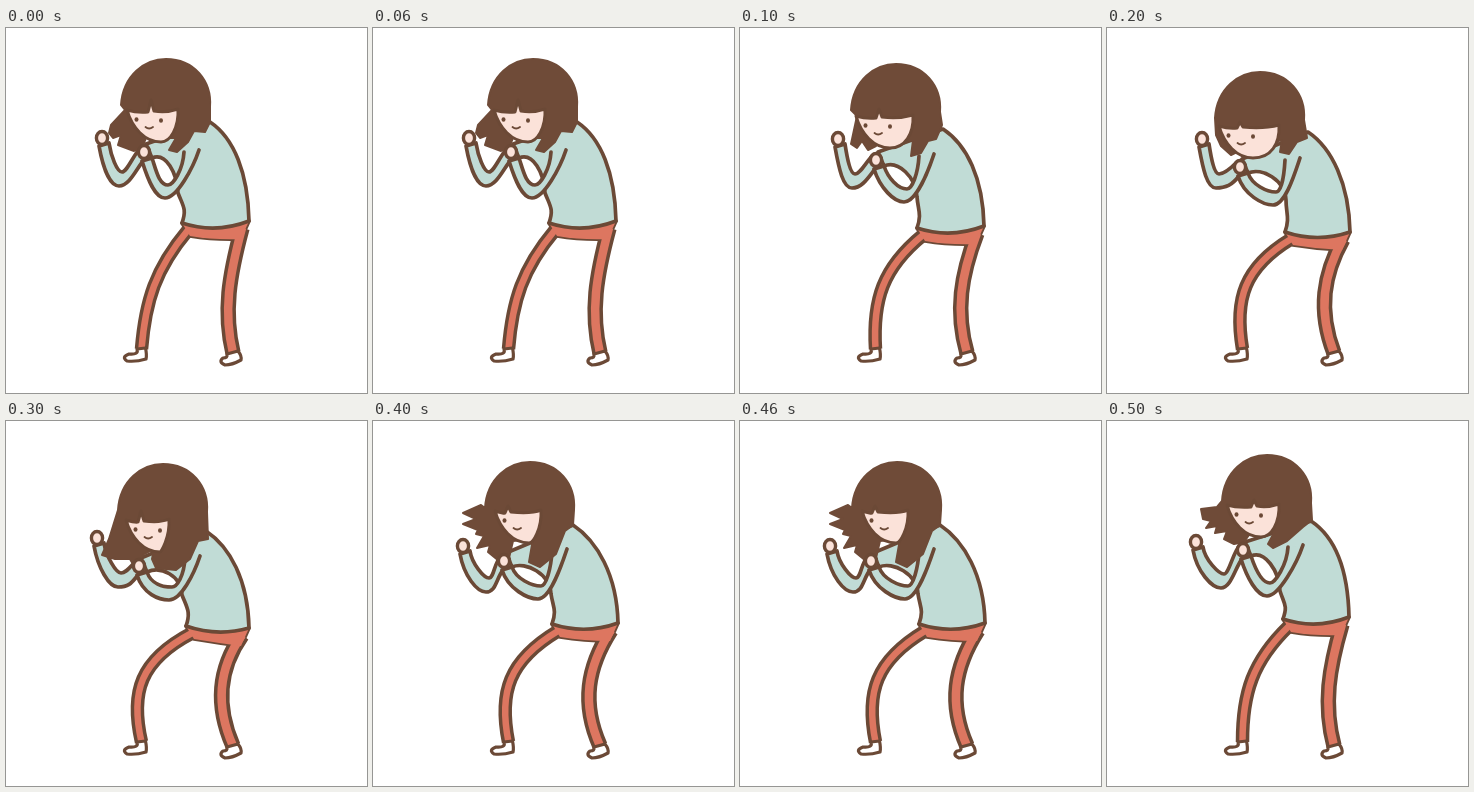
These frames come from a looping animation (361x365 px, 600 ms). An HTML page:

```html
<!DOCTYPE html>
<html lang="en">
<head>
<meta charset="utf-8">
<title>Shadow boxing</title>
<style>
  html, body { margin: 0; width: 100%; height: 100%; overflow: hidden; background: #fff; }
  svg { display: block; width: 100%; height: 100%; }
  path, ellipse { stroke: #6b4936; stroke-width: 3.7; stroke-linejoin: round; stroke-linecap: round; }
  .leg { fill: none; stroke-linecap: butt; }
  .legFill { stroke: #dd7660; }
  .pants { fill: #dd7660; }
  .shirt { fill: #c1dcd6; }
  .skin { fill: #fbe2d9; }
  .shoe { fill: #fff; stroke-width: 3.2; }
  .hair { fill: #6f4b38; stroke: #6f4b38; stroke-width: 2; }
  .hand { stroke-width: 3.4; }
  .face { stroke-width: 3; }
  .eye { fill: #6b4936; stroke: none; }
  .mouth { fill: none; stroke-width: 1.8; }
</style>
</head>
<body>
<svg id="stage" viewBox="0 0 361 365"></svg>
<script>
const STEP = 100;
const stage = document.getElementById('stage');

// Joints: back of neck, waist ends, knee x, far hand and elbow,
// near hand, elbow and shoulder.
const bodies = [
  { back: [204, 94], waist: [176, 195, 243, 193], knees: [148, 223], far: [96, 110, 113, 158], near: [138, 124, 159, 170, 193, 122] },
  { back: [203, 101], waist: [177, 200, 244, 198], knees: [143, 221.5], far: [98, 111, 112, 160], near: [136, 132, 164, 174, 194, 126] },
  { back: [201, 104], waist: [178, 204, 243, 204], knees: [139, 218], far: [95, 111, 109, 160], near: [133, 139, 166, 177, 193, 130] },
  { back: [200, 110], waist: [180, 205, 243, 207], knees: [137, 216], far: [91, 117, 112, 166], near: [133, 145, 163, 179, 194, 135] },
  { back: [200, 104], waist: [179, 203, 245, 202], knees: [138, 216.5], far: [90, 125, 113, 171], near: [131, 140, 165, 178, 194, 128] },
  { back: [204, 100], waist: [176, 198, 242, 196], knees: [145, 222], far: [89, 121, 114, 167], near: [136, 129, 160, 175, 196, 124] }
];

// Head: crown, face centre, face width to the right, parting in the fringe.
const heads = [
  { crown: [160, 31], face: [143, 92], right: 29, part: [2, -20] },
  { crown: [156, 36], face: [138, 98], right: 35, part: [1, -17] },
  { crown: [153, 44], face: [134, 108], right: 38, part: [-1, -14] },
  { crown: [157, 43], face: [142, 109], right: 21, part: [-7, -19] },
  { crown: [157, 41], face: [144, 100], right: 24, part: [-9, -15], wink: true },
  { crown: [160, 34], face: [142, 94], right: 30, part: [5, -15] }
];

// Loose hair ends, from the right side round to the left.
const locks = [
  '204,94 199,104 188,103 182,114 171,124 163,122 170,110 140,110 137,117 128,123 112,117 115,107 107,110 103,105 105,97 119,82',
  '202,97 196,111 188,113 181,125 171,128 173,112 135,112 136,118 128,122 122,113 117,120 111,116 117,88',
  '200,110 190,114 182,126 173,124 175,112 130,124 124,127 114,118 109,107',
  '202,118 192,120 184,138 170,149 150,147 146,138 148,128 138,133 128,145 124,138 109,138 96,134 103,118',
  '200,104 192,110 183,133 167,146 156,141 160,118 140,120 136,137 126,140 115,131 117,124 104,127 111,115 103,113 105,109 90,103 103,98 90,92 108,84',
  '205,99 196,106 180,120 166,127 161,123 168,110 142,114 137,121 127,123 117,118 120,110 108,112 110,105 99,107 104,100 96,98 94,88 110,86'
];

const path = (cls, d, extra = '') => `<path class="${cls}" d="${d}" ${extra}/>`;

const oval = (cls, x, y, rx, ry) =>
  `<ellipse class="${cls}" cx="${x}" cy="${y}" rx="${rx}" ry="${ry}"/>`;

// Cubic from a to b whose middle lies on m.
function bend(a, m, b, dx, dy) {
  const half = i => (8 * m[i] - a[i] - b[i]) / 6;
  const x = half(0), y = half(1);
  return `M${a} C${x + dx},${y + dy} ${x - dx},${y - dy} ${b}`;
}

function legs({ waist: [lx, ly, rx, ry], knees: [kl, kr] }) {
  const left = bend([lx + 6, ly + 7], [kl, 258], [135.5, 321], 5, -16);
  const right = bend([rx - 7, ry + 7], [kr, 265], [227, 325], 3, -18);
  const hips = `M${lx},${ly} L${rx},${ry} L${rx - 8},${ry + 18}
    Q${lx + 32},${ly + 17} ${lx + 8},${ly + 13} Z`;
  return path('leg', left, 'style="stroke-width:13.5"')
    + path('leg', right, 'style="stroke-width:15.5"')
    + path('pants', hips)
    + path('leg legFill', left, 'style="stroke-width:6.5"')
    + path('leg legFill', right, 'style="stroke-width:8.5"')
    + path('pants', hips, 'style="stroke:none"')
    + path('shoe', 'M131,321 L139.500,320 Q141,327 140,331 Q130,334 121,333 Q115,329 123,326 Q133,327 131,321 Z')
    + path('shoe', 'M221,326 L232,323 Q236,328 235,332 Q226,337 219,337 Q212,334 217,330 Q222,330 221,326 Z');
}

function torso({ back: [bx, by], waist: [lx, ly, rx, ry], near: [nx, ny, ex, ey] }) {
  return path('shirt', `M${nx + 2},${ny - 8} L${bx},${by}
    C${bx + 24},${by + 16} ${rx - 1},${ry - 48} ${rx},${ry}
    Q${(lx + rx) / 2},${ly + 11} ${lx},${ly}
    C${lx + 5},${ly - 14} ${lx + 1},${ey + 8} ${ex + 13},${ey - 5}
    C${ex + 12},${ey - 25} ${nx + 22},${ny} ${nx + 8},${ny + 6} Z`);
}

function farArm({ far: [hx, hy, ex, ey], near: [nx, ny] }) {
  return path('shirt', `M${nx - 1},${ny + 9}
    C${nx - 8},${ny + 18} ${ex + 10},${ey} ${ex},${ey}
    C${ex - 9},${ey} ${hx + 1},${hy + 30} ${hx - 3},${hy + 8}
    L${hx + 7},${hy + 5}
    C${hx + 9},${hy + 18} ${ex - 2},${ey - 14} ${ex + 3},${ey - 14}
    C${ex + 8},${ey - 14} ${nx - 10},${ny + 2} ${nx - 3},${ny - 5}`);
}

function nearArm({ near: [hx, hy, ex, ey, sx, sy] }) {
  return path('shirt', `M${sx},${sy}
    C${sx - 6},${sy + 18} ${ex + 12},${ey} ${ex},${ey}
    C${ex - 10},${ey} ${hx + 4},${hy + 28} ${hx - 2},${hy + 9}
    L${hx + 8},${hy + 6}
    C${hx + 12},${hy + 18} ${ex - 6},${ey - 13} ${ex + 3},${ey - 13}
    C${ex + 8},${ey - 13} ${sx - 16},${sy + 20} ${sx - 15},${sy + 2}`);
}

function hair({ crown: [x, y] }, ends) {
  return path('hair', `M${x - 45},${y + 46}
    C${x - 43},${y + 16} ${x - 21},${y} ${x},${y}
    C${x + 28},${y} ${x + 46},${y + 22} ${x + 44},${y + 48}
    L${ends} Z`);
}

function face({ face: [x, y], right: r, part: [px, py], wink }) {
  const shape = `M-22,-10 Q-12,-7 ${px - 3},-8 L${px},${py} L${px + 3},-9
    Q${r * 0.6},-7 ${r},-11 C${r + 1},8 ${r - 8},22 12,22 C-4,22 -17,8 -22,-10 Z`;
  return `<g transform="translate(${x} ${y})">`
    + path('skin face', shape)
    + oval('eye', -12.5, -0.5, 2, 2.3)
    + (wink ? '' : oval('eye', 12, 0.5, 2, 2.3))
    + path('mouth', 'M-3.5,7 Q0,10 4,7')
    + '</g>';
}

const hand = ([x, y]) => oval('skin hand', x, y, 5.6, 6.5);

function drawPose(i) {
  const body = bodies[i], head = heads[i];
  stage.innerHTML = legs(body) + torso(body) + farArm(body) + hand(body.far)
    + nearArm(body) + hair(head, locks[i]) + face(head) + hand(body.near);
}

let shown = -1;
function tick(now) {
  const i = Math.floor(now / STEP) % bodies.length;
  if (i !== shown) drawPose(shown = i);
}

const start = performance.now();
function loop() {
  tick(performance.now() - start);
  requestAnimationFrame(loop);
}
loop();
</script>
</body>
</html>
```
